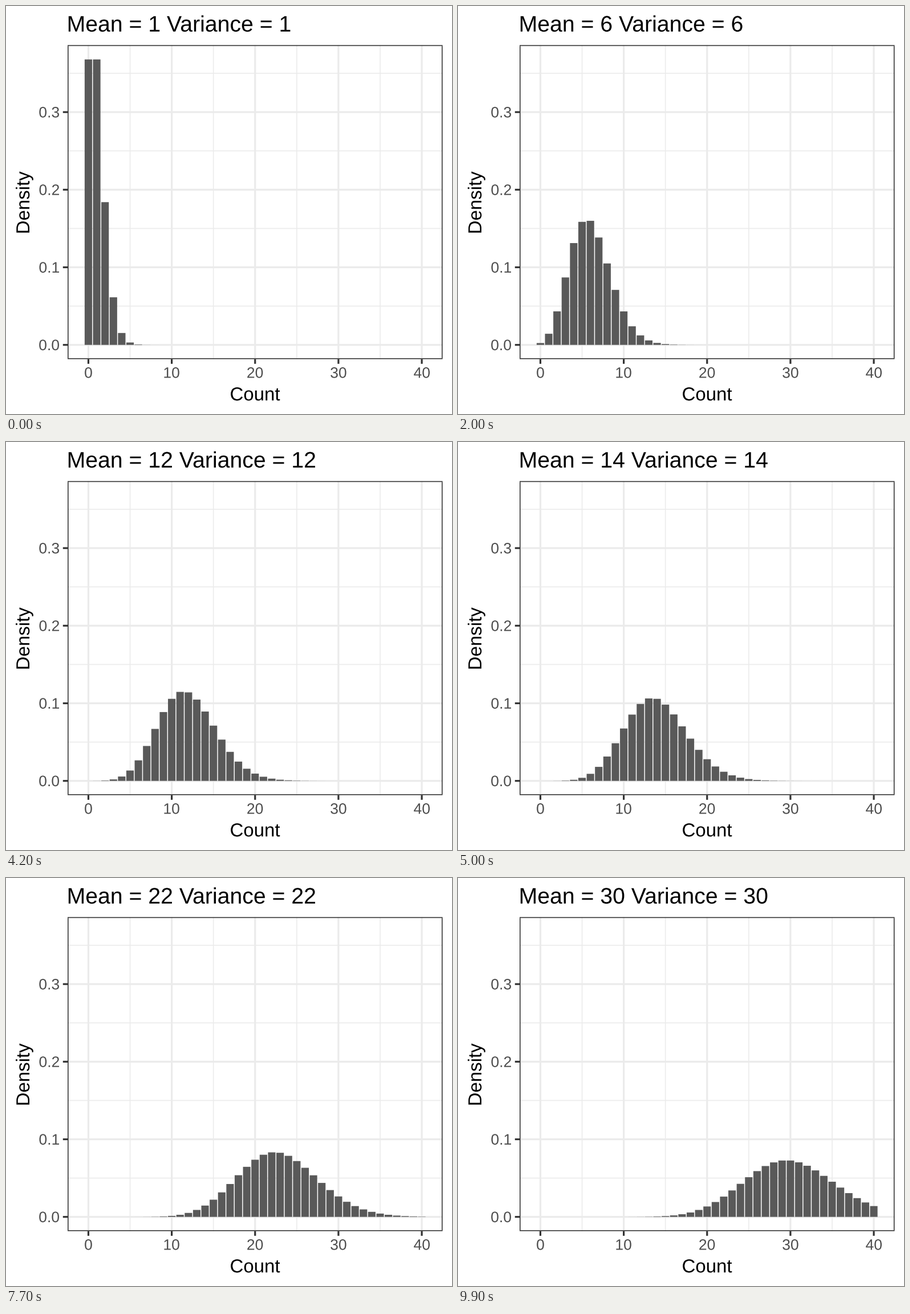
Recreate the animation shown at these times as a matplotlib script. Size 782 by 716 pixels, loop 10000 ms.

```python
import matplotlib.pyplot as plt
import numpy as np
from matplotlib.animation import FuncAnimation
from matplotlib.patches import PathPatch, Rectangle
from matplotlib.textpath import TextPath
from matplotlib.transforms import Affine2D

W, H, DPI = 782, 716, 64
LEFT, RIGHT, TOP, BOTTOM = 108.0, 765.5, 68.6, 619.7
X0, X_UNIT = 144.46, 14.6144
Y0, Y_UNIT = 594.7, 1361.7
LINE, TICK = 3.2, 8.2
GRID, BAR, DARK, LABEL = "#ebebeb", "#595959", "#333333", "#4d4d4d"
TITLE_SIZE, AXIS_SIZE, TICK_SIZE = 39.2, 33, 26.5

fig = plt.figure(figsize=(W / DPI, H / DPI), dpi=DPI, facecolor="white")
ax = fig.add_axes([0, 0, 1, 1])
ax.set(xlim=(0, W), ylim=(H, 0))
ax.axis("off")


def px(v):
    return X0 + v * X_UNIT


def py(v):
    return Y0 - v * Y_UNIT


def box(x0, y0, x1, y1, color):
    rect = Rectangle((x0, y0), x1 - x0, y1 - y0, fc=color, lw=0, snap=False)
    return ax.add_patch(rect)


def vline(x, y0, y1, width, color):
    box(x - width / 2, y0, x + width / 2, y1, color)


def hline(y, x0, x1, width, color):
    box(x0, y - width / 2, x1, y + width / 2, color)


def text_path(s, x, y, size, align=0.5, angle=0):
    """Outline of s with its baseline at y; align 0, 0.5 or 1 sets the anchor."""
    path = TextPath((0, 0), s, size=size, prop={"family": "Liberation Sans"})
    ink = path.get_extents()
    place = (Affine2D().translate(-ink.x0 - align * ink.width, 0)
             .scale(1, -1).rotate_deg(-angle).translate(x, y))
    return path.transformed(place)


def text(*args, color="black", **kwargs):
    patch = PathPatch(text_path(*args, **kwargs), fc=color, lw=0, snap=False)
    return ax.add_patch(patch)


def title_path(mean):
    return text_path(f"Mean = {mean} Variance = {mean}",
                     109.8, 44.8, TITLE_SIZE, align=0)


# Grid: thin minor lines under the major ones
x_ticks = [0, 10, 20, 30, 40]
y_ticks = [0, 0.1, 0.2, 0.3]
for v in y_ticks:
    hline(py(v + 0.05), LEFT, RIGHT, LINE / 2, GRID)
for v in x_ticks[:-1]:
    vline(px(v + 5), TOP, BOTTOM, LINE / 2, GRID)
for v in y_ticks:
    hline(py(v), LEFT, RIGHT, LINE, GRID)
for v in x_ticks:
    vline(px(v), TOP, BOTTOM, LINE, GRID)

counts = np.arange(41)
bars = [box(px(k - 0.45), Y0, px(k + 0.45), Y0, BAR) for k in counts]

# Panel border, lying just inside the panel
edge = LINE / 2
box(LEFT, TOP, RIGHT, TOP + edge, DARK)
box(LEFT, BOTTOM - edge, RIGHT, BOTTOM, DARK)
box(LEFT, TOP + edge, LEFT + edge, BOTTOM - edge, DARK)
box(RIGHT - edge, TOP + edge, RIGHT, BOTTOM - edge, DARK)

for v in x_ticks:
    vline(px(v), BOTTOM, BOTTOM + TICK, LINE, DARK)
    text(str(v), px(v), 652.5, TICK_SIZE, color=LABEL)
for v in y_ticks:
    hline(py(v), LEFT - TICK, LEFT, LINE, DARK)
    text(f"{v:.1f}", 93, py(v) + 9.3, TICK_SIZE, align=1, color=LABEL)

text("Count", 437.2, 692.2, AXIS_SIZE)
text("Density", 41, 344, AXIS_SIZE, angle=90)
title = ax.add_patch(PathPatch(title_path(1), fc="black", lw=0, snap=False))

log_fact = np.concatenate([[0], np.cumsum(np.log(counts[1:]))])


def poisson(mean):
    return np.exp(counts * np.log(mean) - mean - log_fact)


def cubic_in_out(p):
    return 4 * p**3 if p < 0.5 else 1 - 4 * (1 - p)**3


def build_schedule():
    """One (mean, eased progress to mean + 1, shown mean) per frame."""
    schedule = []
    for mean, n in enumerate([4] * 13 + [3] * 16, start=1):
        steps = np.linspace(0, 1, n) if mean == 1 else np.arange(1, n + 1) / n
        for k, p in enumerate(steps):
            shown = mean if k < (n + 1) // 2 else mean + 1
            schedule.append((mean, cubic_in_out(p), shown))
    return schedule


schedule = build_schedule()


def update(i):
    mean, p, shown = schedule[i]
    density = (1 - p) * poisson(mean) + p * poisson(mean + 1)
    for bar, d in zip(bars, density):
        bar.set_height(-d * Y_UNIT)
    title.set_path(title_path(shown))
    return [*bars, title]


anim = FuncAnimation(fig, update, frames=len(schedule), interval=100,
                     repeat=True, repeat_delay=0)
plt.show()
```
